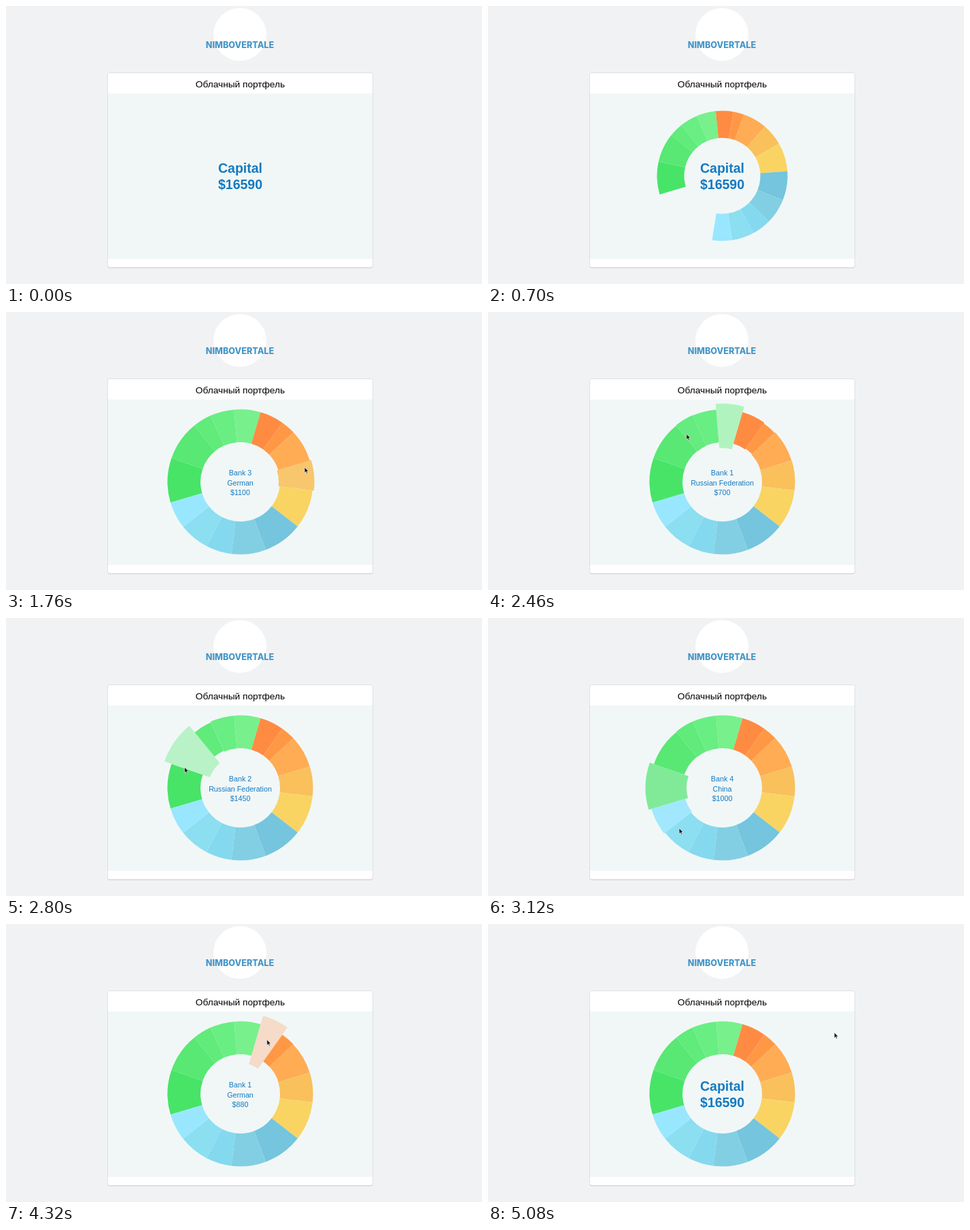
Recreate the animation shown at these times as an HTML page. Size 700x410 px, loop 7.08 s.

```html
<!DOCTYPE html>
<html lang="ru">
<head>
<meta charset="utf-8">
<title>Облачный портфель</title>
<style>
  html, body { margin: 0; width: 100%; height: 100%; overflow: hidden; background: #f1f2f4; }
  svg { display: block; width: 700px; height: 410px; }
  text { font-family: "Liberation Sans", Arial, sans-serif; text-anchor: middle; fill: #147ac0; }
  .brand { font: 800 12.6px Inter, sans-serif; fill: #4596c8; }
  .title { font-size: 13.7px; fill: #000; }
  .total { font-size: 19.5px; font-weight: bold; }
  .detail { font-size: 10.7px; }
</style>
</head>
<body>
<svg viewBox="0 0 700 410">
  <circle cx="344" cy="42" r="39" fill="#fff"/>
  <text class="brand" x="344" y="62">NIMBOVERTALE</text>

  <rect x="149.5" y="99.5" width="390" height="287" rx="3" fill="#c9cacc"/>
  <rect x="149.5" y="98.5" width="390" height="287" rx="3" fill="#fff" stroke="#dfe0e1"/>
  <rect x="150" y="129" width="389" height="244" fill="#f1f7f7"/>
  <text class="title" x="344.5" y="120">Облачный портфель</text>

  <g id="ring"></g>
  <g id="total" class="total">
    <text x="344.5" y="246">Capital</text>
    <text x="344.5" y="270.3">$16590</text>
  </g>
  <g id="detail" class="detail">
    <text x="344.5" y="241"></text>
    <text x="344.5" y="255.6"></text>
    <text x="344.5" y="270.3"></text>
  </g>
  <path id="cursor" d="M0 0V8.2L1.9 6.5L3.3 9.4L4.6 8.8L3.3 6H5.8Z"
        fill="#111" stroke="#fff" stroke-width=".6"/>
</svg>
<script>
const LOOP = 7080, CX = 344.5, CY = 250.5, START = 253.4;
const POP = 13, RISE = 160, FALL = 300;

const groups = [
  ['Russian Federation', [
    ['Moscow', 1650, '#48e468'], ['Bank 2', 1450, '#58e873'], ['Bank 1', 700, '#60eb7b'],
    ['Bank 5', 890, '#69ee83'], ['Kazan', 970, '#78f08c']]],
  ['German', [
    ['Bank 1', 880, '#ff8b42'], ['Bank 2', 530, '#ff9845'], ['Berlin', 1200, '#ffac54'],
    ['Bank 3', 1100, '#f9c05c'], ['Bank 4', 1440, '#f9d463']]],
  ['China', [
    ['Pekin', 1450, '#74c5dd'], ['Bank 1', 1270, '#82cfe3'], ['Bank 2', 950, '#84d9ef'],
    ['Bank 3', 1110, '#8cdef1'], ['Bank 4', 1000, '#98e7ff']]]
];

// [time, slice under the pointer], -1 for none
const hovers = [
  [1720, 8], [2060, 7], [2200, 6], [2300, 4], [2440, 2], [2680, 1], [2870, 0],
  [3083, 14], [3130, 13], [3260, 12], [3350, 11], [3530, 10], [3730, 9],
  [3860, 8], [3960, 7], [4060, 5], [4690, 6], [4780, -1]
];

// pointer path around the ring: [time, degrees, radius]
const route = [
  [1360, 84, 305], [1700, 80, 104], [1760, 77.2, 97], [2040, 71, 95], [2180, 50, 90],
  [2300, 14, 90], [2400, 0, 88], [2460, -36.7, 88], [2680, -48, 88], [2870, -82, 87],
  [3060, -113, 87], [3120, -133.1, 87], [3260, -147, 87], [3500, -182, 88],
  [3660, -212, 92], [3720, -248.1, 95], [3860, -266, 94], [4040, -320, 90],
  [4200, -335, 88], [4640, -331, 92], [4760, -315, 102], [4940, -300, 180], [5080, -298.8, 188]
];

const $ = id => document.getElementById(id);
const clamp = x => Math.min(1, Math.max(0, x));
const mix = (a, b, k) => a + (b - a) * k;
const smooth = k => Math.sin(clamp(k) * Math.PI / 2) ** 2;
const backOut = k => 1 + 3.2 * (k - 1) ** 3 + 2.2 * (k - 1) ** 2;

function point(deg, r) {
  const a = deg * Math.PI / 180;
  return [CX + r * Math.sin(a), CY - r * Math.cos(a)];
}

function sector(a, b, inner, outer) {
  const xy = (deg, r) => point(deg, r).map(v => v.toFixed(2)).join(' ');
  return `M${xy(a, outer)}A${outer} ${outer} 0 0 1 ${xy(b, outer)}` +
         `L${xy(b, inner)}A${inner} ${inner} 0 0 0 ${xy(a, inner)}Z`;
}

const slices = groups.flatMap(([country, items]) =>
  items.map(([name, value, color]) => ({ name, country, value, color })));
const sum = slices.reduce((n, s) => n + s.value, 0);
let turn = 0;
for (const s of slices) {
  s.from = turn;
  s.to = turn += s.value / sum * 360;
  s.path = document.createElementNS('http://www.w3.org/2000/svg', 'path');
  s.path.setAttribute('fill', s.color);
  $('ring').append(s.path);
}

function popOf(index, t) {
  let pop = 0;
  hovers.forEach(([begin, slice], i) => {
    if (slice !== index || t < begin) return;
    const end = hovers[i + 1][0];
    const height = POP * smooth((Math.min(t, end) - begin) / RISE);
    pop += height * (1 - backOut(clamp((t - end) / FALL)));
  });
  return pop;
}

function drawRing(t) {
  const sweep = clamp((t - 100) / 732);
  const grow = smooth((t - 840) / 360);
  const inner = mix(56, 58.5, grow), outer = mix(96, 107, grow);
  $('ring').style.display = sweep > 0 ? '' : 'none';
  slices.forEach((s, i) => {
    const pop = popOf(i, t);
    s.path.setAttribute('d',
      sector(START + s.from * sweep, START + s.to * sweep, inner - pop, outer + pop));
    s.path.setAttribute('opacity', 1 - 0.74 * clamp(pop / POP));
  });
}

function drawLabel(t) {
  const current = hovers.filter(h => h[0] <= t).pop();
  const s = current && slices[current[1]];
  $('total').style.display = s ? 'none' : '';
  $('detail').style.display = s ? '' : 'none';
  if (!s) return;
  [s.name, s.country, '$' + s.value].forEach((line, i) => {
    $('detail').children[i].textContent = line;
  });
}

function drawCursor(t) {
  $('cursor').style.display = t < route[0][0] ? 'none' : '';
  const i = route.findIndex(k => k[0] > t);
  const b = route[i < 0 ? route.length - 1 : i], a = route[i < 0 ? route.length - 2 : Math.max(0, i - 1)];
  const k = b === a ? 0 : clamp((t - a[0]) / (b[0] - a[0]));
  const [x, y] = point(mix(a[1], b[1], k), mix(a[2], b[2], k));
  $('cursor').setAttribute('transform', `translate(${x} ${y})`);
}

const began = performance.now();
function frame() {
  const t = (performance.now() - began) % LOOP;
  drawRing(t);
  drawLabel(t);
  drawCursor(t);
  requestAnimationFrame(frame);
}
frame();
</script>
</body>
</html>
```
